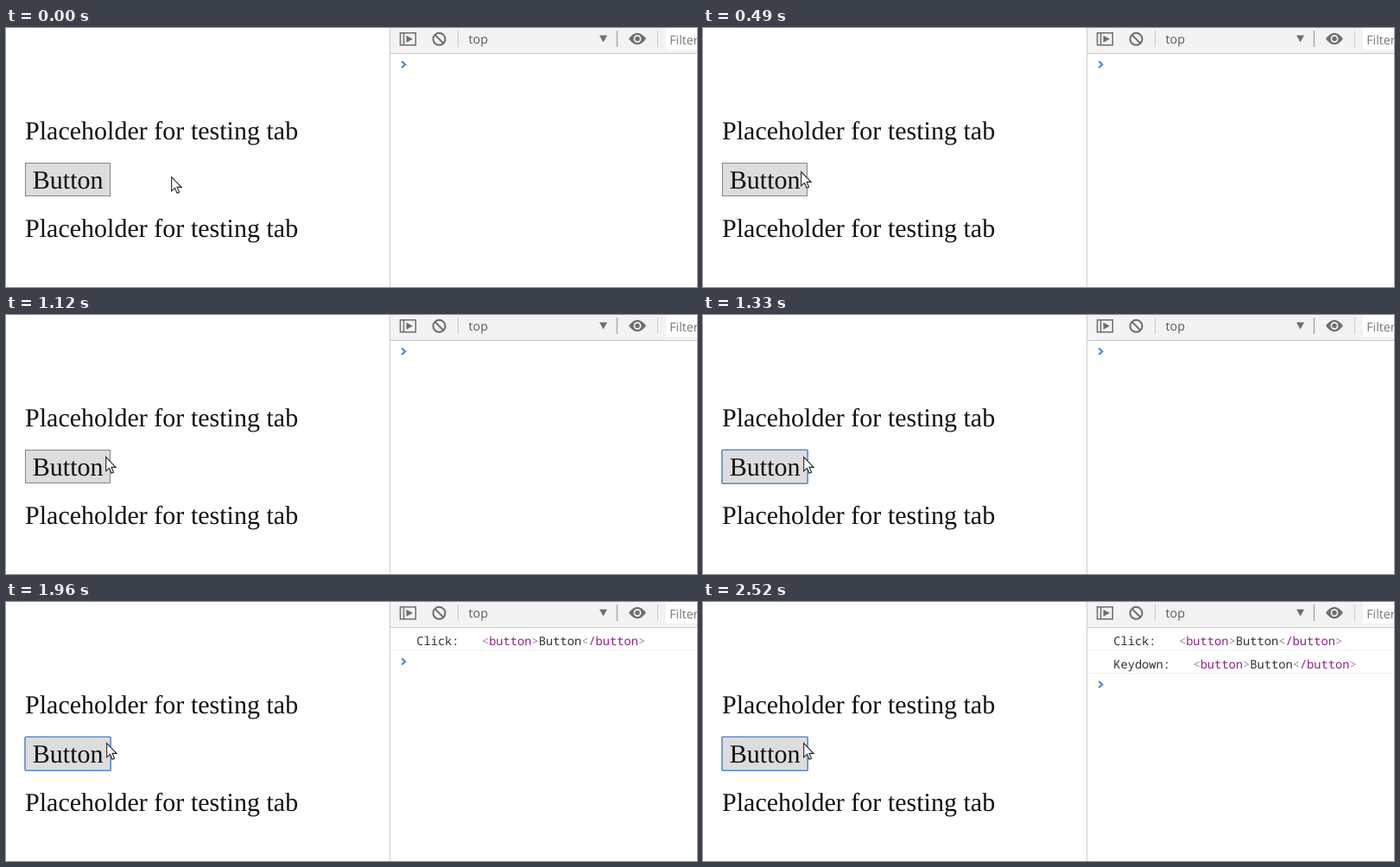
An HTML page for the animation above (2590 ms loop, 800 by 300 pixels).

```html
<!DOCTYPE html>
<html lang="en">
<head>
<meta charset="utf-8">
<title>Button event log</title>
<style>
  html, body { margin: 0; width: 100%; height: 100%; overflow: hidden; background: #fff; }
  svg { display: block; width: 800px; height: 300px; }
  text { white-space: pre; text-rendering: geometricPrecision; }
  .page { font: 30.05px "Liberation Serif", "Times New Roman", serif; fill: #111; }
  .bar { font: 14.3px "Open Sans", sans-serif; fill: #5a5a5a; }
  .log { font: 13.72px "Noto Sans Mono", "Liberation Mono", monospace; fill: #303030; }
  .tag { fill: #8a2388; }
  .bracket { fill: #a085a0; }
  .icon { fill: none; stroke: #6e6e6e; }
</style>
</head>
<body>
<svg viewBox="0 0 800 300">
  <g class="page">
    <text x="22" y="129.3">Placeholder for testing tab</text>
    <rect id="button" fill="#ddd"/>
    <text x="30.8" y="186.3">Button</text>
    <text x="22" y="242.3">Placeholder for testing tab</text>
  </g>

  <path d="M445 0H800V29H445Z" fill="#f3f3f3"/>
  <path d="M444.5 0V300M445 29.5H800" stroke="#ccc"/>
  <path d="M764 0H800V25H764Z" fill="#fff"/>
  <path d="M523.5 3V22M754.5 3V22" stroke="#ccc"/>
  <path d="M707.5 3V22" stroke="#aaa" stroke-width="1.5"/>
  <g class="icon" stroke-width="1.5">
    <path d="M456.5 5.7H474.3V19.8H456.5ZM460.5 5.7V19.8"/>
    <path d="M463.5 8.8L471 12.8 463.5 16.8Z" fill="#6e6e6e" stroke="none"/>
    <circle cx="501.5" cy="12.8" r="7" stroke-width="2"/>
    <path d="M496.6 7.9L506.4 17.7" stroke-width="2"/>
  </g>
  <path d="M687 8.5H696L691.5 16.5Z" fill="#6e6e6e"/>
  <path d="M721 12.5Q731 -1 741 12.5Q731 26 721 12.5Z" fill="#6e6e6e"/>
  <circle cx="731" cy="12.5" r="3.6" fill="#6e6e6e" stroke="#f3f3f3" stroke-width="1.7"/>
  <text class="bar" x="535.5" y="17.8">top</text>
  <text class="bar" x="768.2" y="18.5" style="fill:#777">Filter</text>

  <g id="log" class="log"></g>
  <path id="prompt" d="M458.2 38.5L462.2 42.2 458.2 45.9" fill="none" stroke="#4285cc" stroke-width="2"/>
  <path id="cursor" d="M0 0V16.2L3.8 12.8 6.4 18.7 8.9 17.6 6.4 11.8H11.4Z" fill="#fff" stroke="#222" stroke-width="1.1"/>
</svg>
<script>
const LOOP = 2590, STEP = 70, FOCUS = 1260;
const events = [{ name: 'Click:', time: 1470 }, { name: 'Keydown:', time: 2100 }];
const path = [[70, 192, 173], [420, 114, 167], [630, 114, 167], [840, 115, 166], [1260, 117, 165], [1470, 117, 164]];
const get = id => document.getElementById(id);
const setAll = (el, attrs) => { for (const key in attrs) el.setAttribute(key, attrs[key]); };

const bracket = s => `<tspan class="bracket">${s}</tspan>`;
const tag = s => bracket('&lt;') + `<tspan class="tag">${s}</tspan>` + bracket('&gt;');
get('log').innerHTML = events.map(({ name }, i) => {
  const y = 49.8 + 27 * i;
  const tagX = 550.9 + 16.5 * i;
  return `<g><text x="475.2" y="${y}">${name}</text>` +
    `<text x="${tagX}" y="${y}">${tag('button')}Button${tag('/button')}</text>` +
    `<path d="M445 ${55.5 + 27 * i}H800" stroke="#f0f0f0"/></g>`;
}).join('');
const rows = [...get('log').children];

function cursorAt(t) {
  const next = path.findIndex(p => p[0] > t);
  if (next < 0) return path[path.length - 1].slice(1);
  if (next === 0) return path[0].slice(1);
  const [a, b] = [path[next - 1], path[next]];
  const u = (t - a[0]) / (b[0] - a[0]);
  const eased = u * u * (3 - 2 * u);
  return [1, 2].map(k => Math.round(a[k] + (b[k] - a[k]) * eased));
}

function draw(now) {
  const t = Math.floor((now % LOOP) / STEP) * STEP;
  const [x, y] = cursorAt(t);
  setAll(get('cursor'), { transform: `translate(${x - .3} ${y - .4})` });
  setAll(get('button'), t >= FOCUS
    ? { x: 22, y: 156.2, width: 99.2, height: 39, rx: 1, stroke: '#5b8bcb', 'stroke-width': 1.6 }
    : { x: 22.5, y: 156.5, width: 98, height: 38, rx: 0, stroke: '#858585', 'stroke-width': 1 });
  const shown = events.filter(e => t >= e.time).length;
  rows.forEach((row, i) => setAll(row, { visibility: i < shown ? 'visible' : 'hidden' }));
  setAll(get('prompt'), { transform: `translate(0 ${26.7 * shown})` });
}

function frame() {
  draw(performance.now());
  requestAnimationFrame(frame);
}
frame();
</script>
</body>
</html>
```
